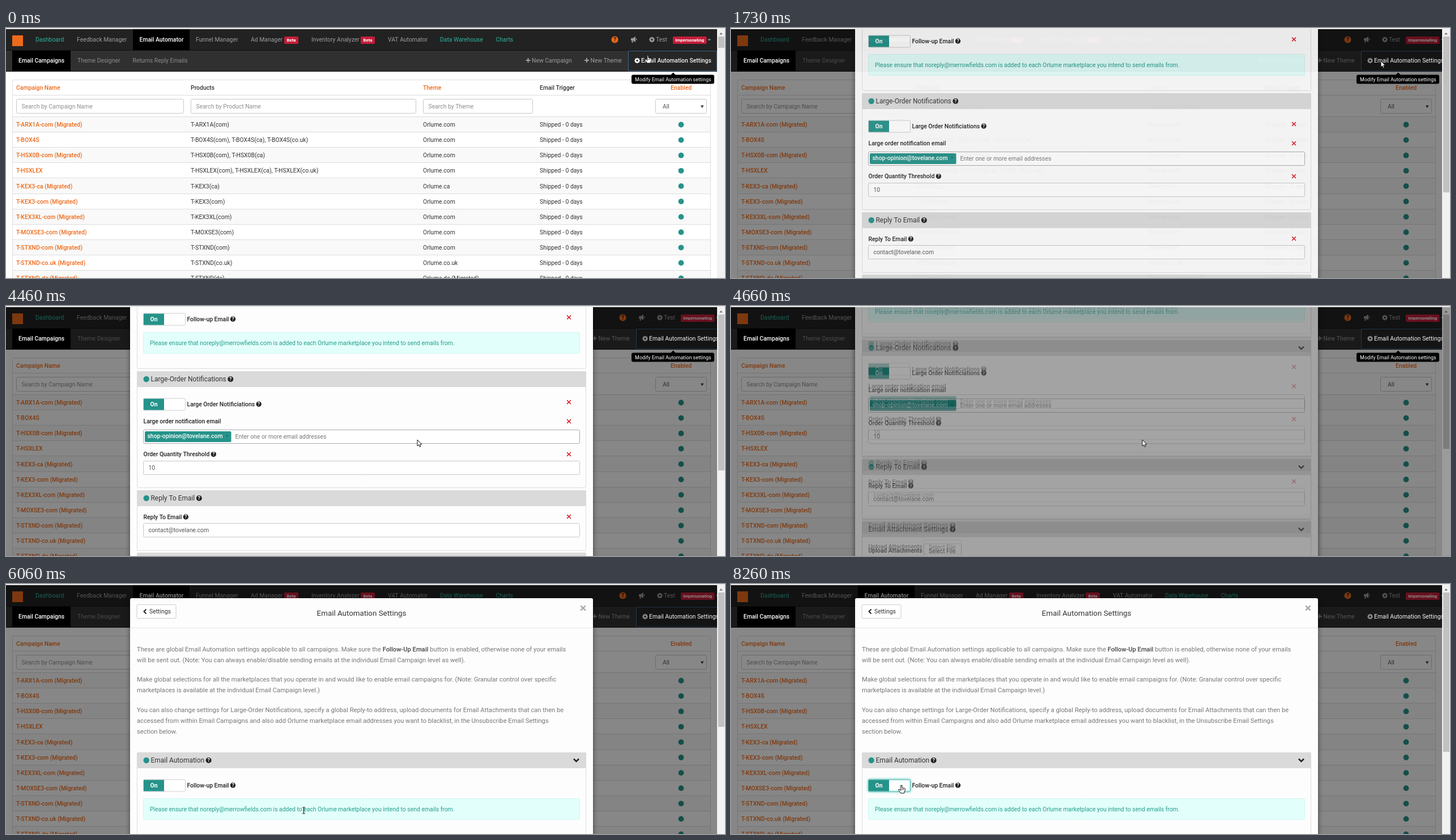
An HTML page with a canvas for the animation above (8.32 s loop, 1269 by 441 pixels).

```html
<!DOCTYPE html>
<html lang="en">
<head>
<meta charset="utf-8">
<title>Email Automation Settings</title>
<style>
html, body { margin: 0; width: 100%; height: 100%; overflow: hidden; background: #fff; }
canvas { display: block; }
</style>
</head>
<body>
<canvas id="stage" width="1269" height="441"></canvas>
<script>
const W = 1269, H = 441, LOOP = 8320, VIEW = 1255;
const TEAL = '#26938a', ORANGE = '#ee6a1a', RED = '#c41e3a', SHOP = 'Orlume';
const screen = document.getElementById('stage').getContext('2d');
const buffer = new OffscreenCanvas(W, H).getContext('2d');
let ctx = screen;

// Paints a group off screen, then blends it as one picture
function layer(alpha, paint) {
  buffer.clearRect(0, 0, W, H);
  ctx = buffer;
  paint();
  ctx = screen;
  ctx.globalAlpha = alpha;
  ctx.drawImage(buffer.canvas, 0, 0);
  ctx.globalAlpha = 1;
}

// Linear track through [time, value] points
function track(t, points) {
  if (t <= points[0][0]) return points[0][1];
  for (let i = 1; i < points.length; i++) {
    const [t0, v0] = points[i - 1], [t1, v1] = points[i];
    if (t <= t1) return v0 + (v1 - v0) * (t - t0) / (t1 - t0);
  }
  return points[points.length - 1][1];
}

function rect(x, y, w, h, fill, stroke, r = 0) {
  ctx.beginPath();
  if (stroke) ctx.roundRect(x + .5, y + .5, w - 1, h - 1, r);
  else ctx.roundRect(x, y, w, h, r);
  if (fill) { ctx.fillStyle = fill; ctx.fill(); }
  if (stroke) { ctx.strokeStyle = stroke; ctx.lineWidth = 1; ctx.stroke(); }
}

function dot(x, y, r, color) {
  ctx.beginPath();
  ctx.arc(x, y, r, 0, 7);
  ctx.fillStyle = color;
  ctx.fill();
}

function line(points, color, width = 1) {
  ctx.beginPath();
  points.forEach(([x, y]) => ctx.lineTo(x, y));
  ctx.strokeStyle = color;
  ctx.lineWidth = width;
  ctx.stroke();
}

function shape(points, fill, stroke) {
  ctx.beginPath();
  points.forEach(([x, y]) => ctx.lineTo(x, y));
  ctx.closePath();
  ctx.fillStyle = fill;
  ctx.fill();
  if (stroke) { ctx.strokeStyle = stroke; ctx.lineWidth = 1; ctx.stroke(); }
}

// y is the middle of the capitals; returns the right edge
function text(s, x, y, color = '#333', size = 10.4, weight = 400, align = 'left') {
  ctx.font = `${weight} ${size}px Roboto, sans-serif`;
  ctx.textAlign = align;
  ctx.fillStyle = color;
  ctx.fillText(s, x, y + size * .355);
  return x + ctx.measureText(s).width;
}

function help(x, y, r = 4.7, color = '#222', mark = '#fff') {
  dot(x, y, r, color);
  text('?', x, y, mark, r * 1.75, 700, 'center');
}

function cross(x, y, r, color, width) {
  line([[x - r, y - r], [x + r, y + r]], color, width);
  line([[x + r, y - r], [x - r, y + r]], color, width);
}

function plus(x, y, color) {
  rect(x - 4, y - 1, 8, 2, color);
  rect(x - 1, y - 4, 2, 8, color);
}

function gear(x, y, color) {
  ctx.beginPath();
  ctx.arc(x, y, 2.8, 0, 7);
  ctx.strokeStyle = color;
  ctx.lineWidth = 2.3;
  ctx.stroke();
  for (let i = 0; i < 8; i++) {
    const c = Math.cos(i * Math.PI / 4), s = Math.sin(i * Math.PI / 4);
    line([[x + 3 * c, y + 3 * s], [x + 4.8 * c, y + 4.8 * s]], color, 1.8);
  }
}

function badge(s, x, y, w) {
  rect(x, y - 6, w, 13, RED, null, 2);
  text(s, x + w / 2, y + .5, '#fff', 7.8, 700, 'center');
}

// Navigation labels that stay bright above the backdrop
function brightLabels(shift) {
  text('Email Campaigns', 22, 57.5, '#fff', 10.4, 500);
  text('Email Automation Settings', 1121 + shift, 57.5, '#f2f2f2', 10.4, shift ? 400 : 500);
}

function drawNav(shift, focus) {
  rect(0, 2, VIEW, 38, '#222');
  rect(0, 39, VIEW, 1, '#111');
  rect(0, 40, VIEW, 37, '#303030');
  rect(0, 76, VIEW, 1, '#151515');
  rect(11, 13, 19, 19, ORANGE);
  rect(224, 2, 100, 37, '#000');
  rect(11, 40, 103, 36, '#000');
  const aqua = '#2bb5a0', grey = '#9d9d9d';
  [['Dashboard', 52, aqua], ['Feedback Manager', 125, grey], ['Funnel Manager', 335, grey],
   ['Ad Manager', 432, grey], ['Inventory Analyzer', 539, grey], ['VAT Automator', 674, grey],
   ['Data Warehouse', 766, aqua], ['Charts', 864.5, aqua]]
    .forEach(([s, x, c]) => text(s, x, 20.5, c));
  text('Email Automator', 235.5, 20.5, '#fff', 10.4, 500);
  badge('Beta', 491, 21, 25);
  badge('Beta', 626, 21, 25);
  text('Theme Designer', 126, 57.5, '#8c8c8c');
  text('Returns Reply Emails', 223.5, 57.5, '#8c8c8c');

  ctx.save();
  ctx.translate(shift, 0);
  help(1074.5, 20.5, 6, ORANGE, '#222');
  shape([[1103, 18], [1106, 18], [1111, 15], [1111, 25], [1106, 22], [1103, 22]], '#999');
  rect(1104.5, 22, 2, 4, '#999');
  rect(1112, 18.5, 1.3, 3, '#999');
  gear(1140, 20.5, grey);
  text('Test', 1147, 20.5, grey);
  badge('Impersonating', 1177, 21, 59.5);
  shape([[1238.5, 19.5], [1244, 19.5], [1241.2, 22.5]], '#999');
  plus(921.5, 57, grey);
  text('New Campaign', 928, 57.5, grey);
  plus(1025, 57, grey);
  text('New Theme', 1031.5, 57.5, grey);
  if (focus) rect(1098, 40, 157, 36, '#262626', '#44688c');
  gear(1114, 57.5, '#fff');
  ctx.restore();
}

function field(x, y, w, value, h = 26, color = '#8e8e8e') {
  rect(x, y, w, h, '#fff', '#c8c8c8', 2);
  text(value, x + 9.5, y + h / 2, color);
}

const skus = [
  ['ARX1A-com', 'ARX1A(com)'],
  ['BOX4S', 'BOX4S(com), T-BOX4S(ca), T-BOX4S(co.uk)'],
  ['HSX0B-com', 'HSX0B(com), T-HSX0B(ca)'],
  ['HSXLEX', 'HSXLEX(com), T-HSXLEX(ca), T-HSXLEX(co.uk)'],
  ['KEX3-ca', 'KEX3(ca)', 'ca'],
  ['KEX3-com', 'KEX3(com)'],
  ['KEX3XL-com', 'KEX3XL(com)'],
  ['MOXSE3-com', 'MOXSE3(com)'],
  ['STXND-com', 'STXND(com)'],
  ['STXND-co.uk', 'STXND(co.uk)', 'co.uk'],
  ['STXND-de', 'STXND(de)', 'de (Migrated)']
];

function drawTable() {
  rect(11, 91, 1233, 380, '#fff', '#ddd', 2);
  text('Campaign Name', 18, 105, ORANGE, 10.4, 500);
  text('Products', 326, 105, '#333', 10.4, 500);
  text('Theme', 736, 105, ORANGE, 10.4, 500);
  text('Email Trigger', 942, 105, '#333', 10.4, 500);
  text('Enabled', 1191.5, 105, ORANGE, 10.4, 500, 'center');
  rect(12, 118, 1231, 1, '#ddd');
  field(18, 125, 296, 'Search by Campaign Name');
  field(326, 125, 398, 'Search by Product Name');
  field(736, 125, 194, 'Search by Theme');
  rect(1146, 125, 91, 26, '#fff', '#c8c8c8', 2);
  text('All', 1159, 138.5, '#555');
  shape([[1226, 136.5], [1231.5, 136.5], [1228.7, 141]], '#333');
  skus.forEach(([name, products, site = 'com'], i) => {
    const y = 157 + i * 27.1, mid = y + 13.5;
    rect(12, y, 1231, 27.1, i % 2 ? '#fff' : '#f8f9f8');
    rect(12, Math.round(y) - 1, 1231, 1, '#ddd');
    text('T-' + name + (name.includes('-') ? ' (Migrated)' : ''), 18, mid, ORANGE, 10.4, 500);
    text('T-' + products, 326, mid);
    text(SHOP + '.' + site, 736, mid);
    text('Shipped - 0 days', 942, mid);
    dot(1191.5, mid, 4.9, TEAL);
  });
}

function drawTooltip() {
  shape([[1173, 83], [1177.5, 78.5], [1182, 83]], '#000');
  rect(1104, 82.5, 146, 16, '#000', null, 3);
  text('Modify Email Automation settings', 1177.3, 90.7, '#fff', 8.94, 400, 'center');
}

function drawScrollbar(bottom) {
  rect(VIEW, 2, W - VIEW, H, '#f1f1f1');
  shape([[1259, 11.5], [1265, 11.5], [1262, 8]], '#777');
  rect(1257, 15, 11, bottom - 15, '#c1c1c1');
}

function panel(title, y, bottom, dotted, chevrons) {
  rect(231, y, 793, bottom - y, null, '#ddd', 2);
  rect(231, y, 793, 28, '#dadada', null, 2);
  if (dotted) dot(247.7, y + 14, 5.2, TEAL);
  const end = text(title, dotted ? 255.5 : 242.5, y + 14, '#333', 11.95);
  help(end + 7.5, y + 14, 5);
  if (chevrons) line([[1002, y + 11.5], [1006.5, y + 16], [1011, y + 11.5]], '#222', 2.5);
}

function label(s, x, y, tip) {
  const end = text(s, x, y, '#222', 10.4, 500);
  if (tip) help(end + 7, y);
}

function toggle(y, glow) {
  ctx.save();
  if (glow) { ctx.shadowColor = '#5cc8c0'; ctx.shadowBlur = 4; }
  rect(242, y, 75, 22, '#fff', glow ? '#4db8ae' : '#ccc', 2);
  ctx.restore();
  rect(243, y + 1, 36, 20, TEAL);
  text('On', 261, y + 11, '#fff', 10.4, 700, 'center');
}

const paragraphs = [
  [134, 'will be sent out. (Note: You can always enable/disable sending emails at the individual Email Campaign level as well).'],
  [168, 'Make global selections for all the marketplaces that you operate in and would like to enable email campaigns for. (Note: Granular control over specific'],
  [187, 'marketplaces is available at the individual Email Campaign level.)'],
  [222, 'You can also change settings for Large-Order Notifications, specify a global Reply-to address, upload documents for Email Attachments that can then be'],
  [241, `accessed from within Email Campaigns and also add ${SHOP} marketplace email addresses you want to blacklist, in the Unsubscribe Email Settings`],
  [260, 'section below.']
];

function drawModal(scroll, chevrons, glow) {
  ctx.save();
  ctx.translate(0, -scroll);
  ctx.save();
  ctx.shadowColor = 'rgba(0,0,0,.5)';
  ctx.shadowBlur = 9;
  ctx.shadowOffsetY = 3;
  rect(219, 25, 817, 1300, '#fdfdfd', null, 3);
  ctx.restore();

  rect(230.5, 36, 70, 25, '#fff', '#ccc', 2);
  line([[247.5, 44.5], [243.5, 48.5], [247.5, 52.5]], '#222', 2);
  text('Settings', 253, 48.5);
  text('Email Automation Settings', 627.5, 51, '#333', 13.35, 400, 'center');
  cross(1018.5, 42.5, 4.2, '#aaa', 2.5);
  rect(219, 77, 817, 1, '#e5e5e5');

  const grey = '#777', size = 11.2;
  let x = text('These are global Email Automation settings applicable to all campaigns. Make sure the ', 231, 115.5, grey, size);
  x = text('Follow-Up Email', x, 115.5, '#444', size, 500);
  text(' button is enabled, otherwise none of your emails', x, 115.5, grey, size);
  paragraphs.forEach(([y, s]) => text(s, 231, y + .5, grey, size));

  panel('Email Automation', 297, 443, true, chevrons);
  toggle(344.5, glow);
  label('Follow-up Email', 319.5, 355, true);
  rect(242, 378, 771, 38, '#e2fffb', '#d2f5ef', 2);
  text(`Please ensure that noreply@merrowfields.com is added to each ${SHOP} marketplace you intend to send emails from.`, 254, 397, '#249c8c');

  panel('Large-Order Notifications', 447, 653, true, chevrons);
  toggle(494.5);
  label('Large Order Notificiations', 319.5, 505, true);
  label('Large order notification email', 242.5, 535);
  rect(242, 550, 771, 25, '#fff', '#aaa', 2);
  rect(245, 553, 152.5, 19, TEAL, null, 2);
  text('shop-opinion@tovelane.com', 249.5, 561, '#fff', 10.4, 500);
  cross(390, 561, 1.7, '#176b64', 1);
  text('Enter one or more email addresses', 404.5, 562.5, '#777');
  label('Order Quantity Threshold', 242.5, 593.5, true);
  field(242, 605, 771, '10', 25, '#555');

  panel('Reply To Email', 657, 764, true, chevrons);
  label('Reply To Email', 242.5, 704, true);
  field(242, 715, 771, 'contact@tovelane.com', 25, '#555');

  panel('Email Attachment Settings', 767, 900, false, chevrons);
  label('Upload Attachments', 242.5, 818.5);
  rect(340, 806, 67, 26, '#fff', '#ccc', 2);
  text('Select File', 349, 819);

  if (!chevrons) [352, 501.5, 535.5, 593.5, 703.5].forEach(y => cross(993.5, y, 3.4, '#d9232e', 1.5));
  ctx.restore();
}

function drawCursor(kind, x, y) {
  ctx.save();
  ctx.translate(x, y);
  if (kind === 'arrow') {
    shape([[0, 0], [0, 11], [2.5, 8.8], [4.2, 12.5], [6, 11.7], [4.4, 8], [7.6, 8]], '#fff', '#111');
  } else if (kind === 'beam') {
    const c = '#222';
    line([[0, -5], [0, 5]], c, 1.3);
    line([[-2.5, -5.5], [2.5, -5.5]], c);
    line([[-2.5, 5.5], [2.5, 5.5]], c);
  } else {
    shape([[-1.2, -6], [.8, -6], [1, -1.5], [5.8, -.5], [6.5, 1], [5.5, 5], [4.5, 8], [-1.5, 8],
           [-5, 3], [-5, 1.3], [-3.5, 1.3], [-1.2, 3.2]], '#fff', '#111');
    line([[1.2, 0], [1.2, 2.5]], '#111', .8);
    line([[3.4, 0], [3.4, 2.5]], '#111', .8);
  }
  ctx.restore();
}

function cursorAt(t) {
  const x = track(t, [[250, 1133], [850, 1147], [1850, 1147], [2450, 726], [4800, 726], [5150, 733.5],
                      [5350, 733.5], [5950, 525.5], [6200, 525.5], [6850, 301]]);
  const y = track(t, [[250, 54], [850, 58], [1850, 58], [2450, 236], [4800, 236], [5150, 245.5],
                      [5350, 245.5], [5950, 399.5], [6200, 399.5], [6850, 361]]);
  const kind = t < 1450 ? 'hand' : t < 4950 ? 'arrow' : t < 6700 ? 'beam' : 'hand';
  return [kind, x, y];
}

function draw(t) {
  const shade = track(t, [[1440, 0], [1600, .47]]);
  const open = track(t, [[1580, 0], [1730, .92], [1800, 1]]);
  const scroll = t < 4570 ? 332
    : track(t, [[4570, 394], [4660, 387], [4800, 372], [5200, 288], [5380, 110], [5560, 0]]);
  const reload = t >= 4570 && t < 4740;
  const chevrons = reload || t > 5500;
  const dark = track(t, [[4540, 0], [4600, .4], [4660, .36], [4900, 0]]);
  const opened = shade > 0, shift = opened ? 14 : 0;

  rect(0, 0, W, H, '#fff');
  ctx.save();
  ctx.beginPath();
  ctx.rect(0, 2, VIEW, H);
  ctx.clip();
  drawNav(shift, t < 7300);
  drawTable();
  if (opened) rect(0, 2, VIEW, H, `rgba(0,0,0,${shade})`);
  brightLabels(shift);
  if (open > 0) {
    layer(open, () => drawModal(scroll, chevrons, t > 6750));
    if (reload) layer(.35, () => drawModal(394, false));
    if (dark > 0) rect(219, Math.max(2, 25 - scroll), 817, H, `rgba(0,0,0,${dark})`);
  }
  if (t < 5000) drawTooltip();
  ctx.restore();

  rect(0, 0, W, 1.5, '#e4e4e4');
  drawScrollbar(!opened ? 35 : t < 4570 ? 290 : t < 4900 ? 252 : t < 5500 ? 247 : t < 7300 ? 252 : 296);
  if (dark > 0) rect(VIEW, 2, W - VIEW, H, `rgba(0,0,0,${dark})`);
  drawCursor(...cursorAt(t));
}

function frame(now) {
  draw(now % LOOP);
  requestAnimationFrame(frame);
}
requestAnimationFrame(frame);
</script>
</body>
</html>
```
